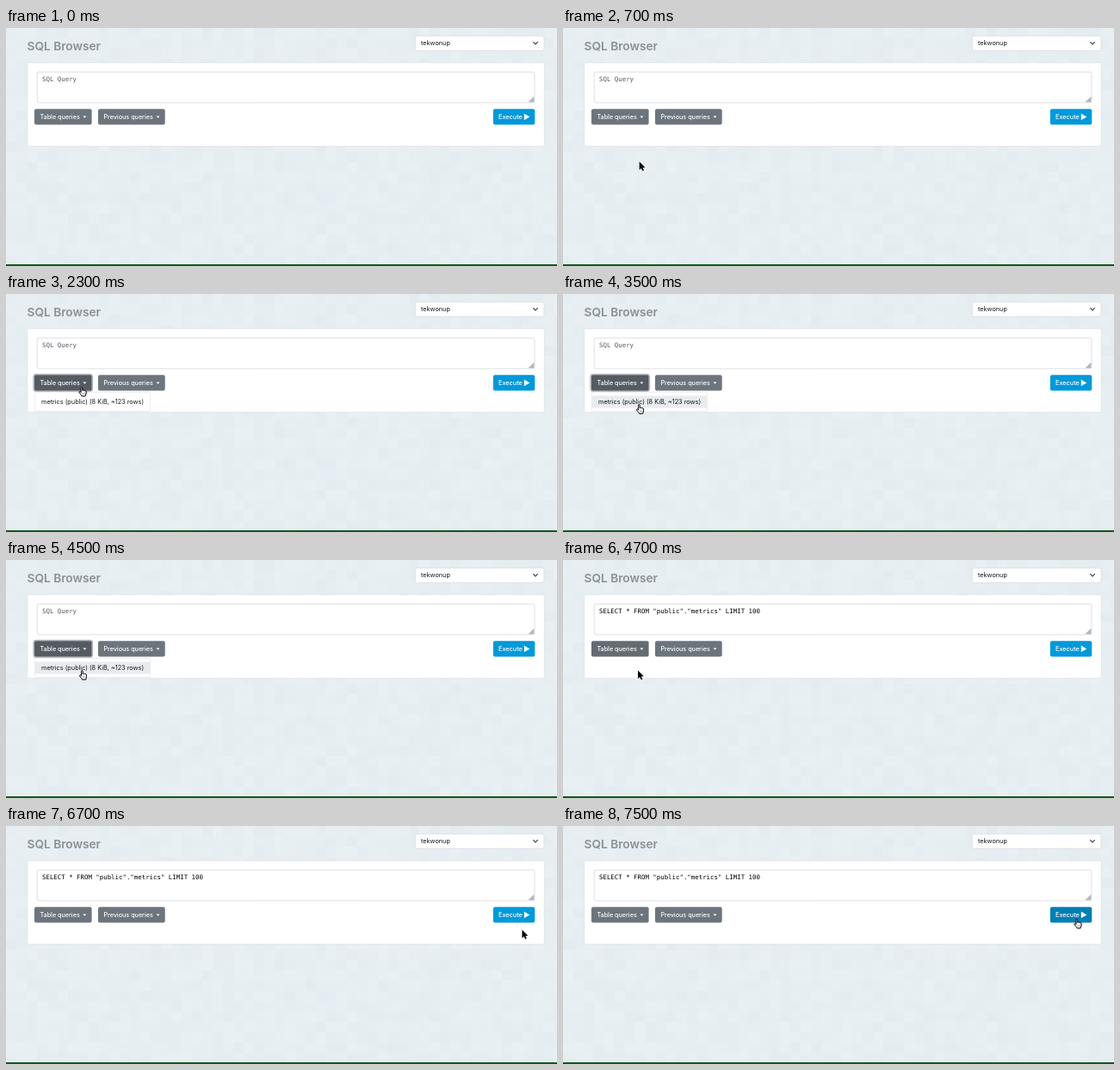
An HTML page with a canvas for the animation above (8000 ms loop, 640 by 277 pixels).

```html
<!DOCTYPE html>
<html lang="en">
<head>
<meta charset="utf-8">
<title>SQL Browser</title>
<style>
html, body { margin: 0; width: 100%; height: 100%; overflow: hidden; background: #e6eef2; }
canvas { display: block; width: 640px; height: 277px; }
</style>
</head>
<body>
<canvas id="stage"></canvas>
<script>
const W = 640, H = 277, LOOP = 8000, TICK = 100;
const SANS = 'Inter, Roboto, sans-serif';
const MONO = '"DejaVu Sans Mono", "Liberation Mono", monospace';
const OPEN = 2300, HOVER = 3100, PICK = 4600, RUN = 7400;

const canvas = document.getElementById('stage');
const dpr = window.devicePixelRatio || 1;
canvas.width = W * dpr;
canvas.height = H * dpr;
const ctx = canvas.getContext('2d');

const ARROW = new Path2D('M0 0V9.7L2.2 7.7L3.8 11.1L5.4 10.4L3.9 7.1H6.9Z');
const HAND = new Path2D('M2.6 6.6V1.1C2.6 .1 4.1 .1 4.1 1.1V4.3C4.3 3.7 5.5 3.8 5.6 4.5C5.9 4 7 4.1 7.1 4.9' +
  'C7.4 4.5 8.5 4.6 8.5 5.5V7.5C8.5 9 7.8 9.3 7.6 10.8H3.6C3.2 9.6 1.6 8.2 .7 6.7C.2 5.8 1.3 5.3 1.8 5.9Z');

// Each move starts where the last one ended; via bends the path.
const START = [565, 106];
const MOVES = [
  { from: 100, until: 400, to: [91, 193], via: [350, 335] },
  { from: 500, until: 1700, to: [84.5, 108], via: [86, 110] },
  { from: 2700, until: 2800, to: [87, 113.5] },
  { from: 3000, until: 3200, to: [85, 128.3] },
  { from: 4500, until: PICK, to: [87, 128.5] },
  { from: 5200, until: 5300, to: [89, 131] },
  { from: 5500, until: 6400, to: [606, 139], via: [281, 318] },
  { from: 6400, until: RUN, to: [593.5, 108], via: [598, 115] }
];

const within = (t, a, b) => t >= a && t < b;
const easeOut = k => Math.sin(k * Math.PI / 2);
const bend = (a, b, c, k) => a * (1 - k) ** 2 + 2 * b * k * (1 - k) + c * k * k;

function pointerAt(t) {
  let pos = START;
  for (const { from, until, to, via = to } of MOVES) {
    if (t <= from) break;
    const k = easeOut(Math.min(1, (t - from) / (until - from)));
    pos = pos.map((p, i) => bend(p, via[i], to[i], k));
  }
  return pos;
}

function box(x, y, w, h, r, fill, stroke, width = 0.6) {
  ctx.beginPath();
  ctx.roundRect(x, y, w, h, r);
  if (fill) { ctx.fillStyle = fill; ctx.fill(); }
  if (stroke) { ctx.strokeStyle = stroke; ctx.lineWidth = width; ctx.stroke(); }
}

function text(str, x, y, font, color) {
  ctx.font = font;
  ctx.fillStyle = color;
  ctx.fillText(str, x, y);
}

function trace(points) {
  ctx.beginPath();
  points.forEach(([x, y]) => ctx.lineTo(x, y));
}

function poly(points, color) {
  trace(points);
  ctx.fillStyle = color;
  ctx.fill();
}

function polyline(points, color, width) {
  trace(points);
  ctx.strokeStyle = color;
  ctx.lineWidth = width;
  ctx.stroke();
}

function drawBackground() {
  ctx.fillStyle = '#e6eef2';
  ctx.fillRect(0, 0, W, H);
  let seed = 71;
  const random = () => (seed = (seed * 16807) % 2147483647) / 2147483647;
  const size = 12;
  for (let y = 0; y < H; y += size) {
    for (let x = 0; x < W; x += size) {
      const tone = random() < 0.5 ? '208,219,223' : '255,255,255';
      ctx.fillStyle = `rgba(${tone},${0.12 * random()})`;
      ctx.fillRect(x, y, size, size);
    }
  }
  ctx.fillStyle = '#0d5a14';
  ctx.fillRect(0, 275, W, 2);
}

function dropdown(label, x, w, color) {
  box(x, 94.3, w, 18.2, 2, color);
  text(label, x + 6.4, 106.1, `500 7.2px ${SANS}`, '#fff');
  const caret = x + w - 10.2;
  poly([[caret, 102.6], [caret + 4, 102.6], [caret + 2, 104.7]], '#fff');
}

function drawMenu(t) {
  box(33.3, 114.2, 134.4, 22.4, 2, '#fff', '#dde0e3');
  if (t >= HOVER) {
    ctx.fillStyle = '#e9ecef';
    ctx.fillRect(33.7, 118.4, 133.6, 14.2);
  }
  text('metrics (public) (8 KiB, ~123 rows)', 41, 128.4, `400 7.3px ${SANS}`, '#15181b');
}

function drawPage(t) {
  text('SQL Browser', 24.5, 26, `600 13.7px ${SANS}`, '#8b9095');

  box(475.3, 9.3, 149.6, 17, 2, '#fff', '#ced4da');
  text('tekwonup', 482, 20.3, `400 7.3px ${SANS}`, '#15181b');
  polyline([[612.3, 16.2], [615, 18.9], [617.7, 16.2]], '#343a40', 1.1);

  box(24.7, 40.3, 600.6, 97.4, 2, '#fff', '#d3dade');
  box(36.2, 51.2, 577.8, 35.7, 2, '#fff', '#c6ccd2');
  poly([[606.5, 86.3], [613.4, 79.4], [613.4, 86.3]], '#b4b7ba');

  const filled = t >= PICK;
  text(filled ? 'SELECT * FROM "public"."metrics" LIMIT 100' : 'SQL Query',
    42, 61.7, `400 7.4px ${MONO}`, filled ? '#000' : '#555c63');

  const open = within(t, OPEN, PICK);
  if (open) box(32.2, 93.7, 68.1, 19.4, 3, null, 'rgba(108,117,125,.5)', 1.8);
  dropdown('Table queries', 33, 66.6, open ? '#545b62' : within(t, PICK, 4900) ? '#646c73' : '#6c757d');
  dropdown('Previous queries', 107, 77.7, '#6c757d');

  box(565.9, 94.3, 48.4, 18.2, 2, t < RUN ? '#0099da' : '#007fb5');
  text('Execute', 572, 106.1, `500 7.3px ${SANS}`, '#fff');
  poly([[601.8, 99.6], [608.3, 103.4], [601.8, 107.2]], '#fff');

  if (open) drawMenu(t);
}

function drawPointer(t) {
  if (t < 100) return;
  const hand = within(t, 1700, 2800) || within(t, HOVER, PICK) || t >= RUN;
  const shape = hand ? HAND : ARROW;
  ctx.save();
  ctx.translate(...pointerAt(t));
  ctx.lineJoin = 'round';
  ctx.strokeStyle = hand ? '#111' : '#fff';
  ctx.lineWidth = hand ? 0.9 : 1.3;
  ctx.fillStyle = hand ? '#fff' : '#000';
  ctx.stroke(shape);
  ctx.fill(shape);
  if (hand) {
    ctx.stroke(shape);
    for (const x of [4.4, 5.7, 7]) polyline([[x, 7], [x, 9]], '#444', 0.4);
  }
  ctx.restore();
}

const start = performance.now();

function frame() {
  const t = Math.floor(((performance.now() - start) % LOOP) / TICK) * TICK;
  ctx.setTransform(dpr, 0, 0, dpr, 0, 0);
  drawBackground();
  drawPage(t);
  drawPointer(t);
  requestAnimationFrame(frame);
}
frame();
</script>
</body>
</html>
```
